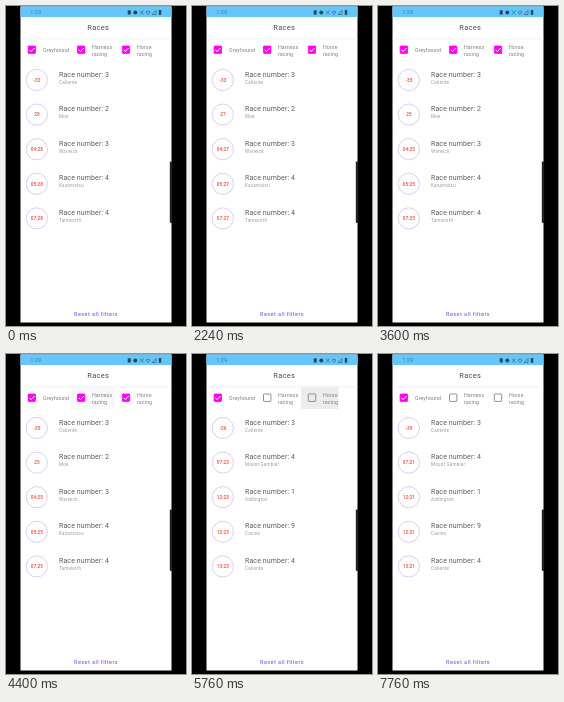
These frames come from a looping animation (180 px wide and 320 px high, 8000 ms). An HTML page:

```html
<!DOCTYPE html>
<html lang="en">
<head>
<meta charset="utf-8">
<title>Races</title>
<style>
  html, body { margin: 0; width: 100%; height: 100%; overflow: hidden; background: #000; }
  svg { display: block; width: 100vw; height: 100vh; font-family: Roboto, sans-serif; }
  .label { font-size: 5.3px; fill: #808080; letter-spacing: .08px; }
  .race { font-size: 7px; fill: #5c5c5c; letter-spacing: .12px; }
  .place { font-size: 4.5px; fill: #9a9a9a; letter-spacing: .24px; }
  .count { font-size: 4.7px; font-weight: 700; fill: #ff5c58; text-anchor: middle; }
  .ring { fill: #fff; stroke: #cdb8f4; stroke-width: .7; }
</style>
</head>
<body>
<svg id="stage" viewBox="0 0 180 320"></svg>
<script>
const LOOP = 8000;
const stage = document.getElementById('stage');

function add(tag, attrs, text) {
  const el = document.createElementNS('http://www.w3.org/2000/svg', tag);
  for (const key in attrs) el.setAttribute(key, attrs[key]);
  if (text !== undefined) el.textContent = text;
  stage.appendChild(el);
  return el;
}
const rect = (x, y, width, height, fill) => add('rect', { x, y, width, height, fill });
const show = (el, on) => el.setAttribute('visibility', on ? 'visible' : 'hidden');
const setText = (el, text) => { if (el.textContent !== text) el.textContent = text; };
const clamp = v => Math.max(0, Math.min(1, v));
const passed = (times, t) => times.filter(at => t >= at).length;

// Screen and status bar
rect(14.5, .4, 151, 316.1, '#fff');
rect(14.5, .4, 151, 10.6, '#64c6fb');
add('text', { x: 24.3, y: 8.3, 'font-size': 5.6, fill: '#4b7f9c' }, '1:29');
rect(121.7, 4.3, 3, 4.2, '#24485c');
add('circle', { cx: 129.3, cy: 6.4, r: 2, fill: '#24485c' });
add('path', { d: 'M134 4.5l3.5 4M137.5 4.5l-3.5 4M140 6q2-2 4 0l-2 2.5zM146 8.5l4-4v4z', fill: 'none', stroke: '#3f6c84', 'stroke-width': .8 });
rect(152.8, 4, 2.4, 4.8, '#24485c');

add('text', { x: 92.2, y: 24.1, 'font-size': 7.5, fill: '#4c4c4c', 'letter-spacing': .25, 'text-anchor': 'middle' }, 'Races');
rect(14.5, 32.6, 151, .6, '#dce8ed');

// Filters: box x, label x, lines, ripple bounds, press / release / fade end
const filters = [
  { x: 21.7, lx: 37, lines: ['Greyhound'] },
  { x: 71.1, lx: 86, lines: ['Harness', 'racing'], left: 65, right: 109, tint: '#f8f8f8', press: 4200, off: 4560, end: 4800 },
  { x: 115.9, lx: 131, lines: ['Horse', 'racing'], left: 109, right: 146.5, tint: '#ececec', press: 5300, off: 5520, end: 6000 }
];
for (const f of filters) {
  if (f.off) f.ripple = rect(f.left, 33.2, f.right - f.left, 21.8, f.tint);
  f.box = add('rect', { x: f.x + .4, y: 40, width: 7.4, height: 7.4, rx: .6, 'stroke-width': .8 });
  f.tick = add('path', { d: `M${f.x + 1.7} 43.8l1.7 1.8 3.3-3.6`, fill: 'none', stroke: '#fff', 'stroke-width': 1 });
  f.lines.forEach((line, i) => {
    const y = f.lines.length === 1 ? 46 : 43 + i * 6.5;
    add('text', { x: f.lx, y, class: 'label' }, line);
  });
}

// Races: number, place, minutes
const first = ['3', 'Caliente'];
const gambier = ['4', 'Mount Gambier', '07:'];
const all = [first, ['2', 'Moe', ''], ['3', 'Warwick', '04:'], ['4', 'Kasamatsu', '05:'], ['4', 'Tamworth', '07:']];
const noHarness = [...all.slice(0, 4), gambier];
const greyhounds = [first, gambier, ['1', 'Addington', '12:'], ['9', 'Casino', '12:'], ['4', 'Caliente', '13:']];

const rows = all.map((_, i) => {
  const y = 74 + i * 34.6;
  add('circle', { cx: 30.8, cy: y, r: 10.6, class: 'ring' });
  return {
    count: add('text', { x: 30.9, y: y + 1.7, class: 'count' }, ''),
    race: add('text', { x: 53, y: y - 3.4, class: 'race' }, ''),
    place: add('text', { x: 53, y: y + 3.6, class: 'place' }, '')
  };
});

add('text', { x: 90.1, y: 310, 'font-size': 5.5, 'font-weight': 500, fill: '#9162f2', 'letter-spacing': .42, 'text-anchor': 'middle' }, 'Reset all filters');
add('rect', { x: 163.8, y: 155.5, width: 2.4, height: 61.5, rx: 1, fill: '#222' });

// The first row ticks late once the list has been rebuilt
const ticks = [1440, 2400, 3440, 4560];
const listTicks = [...ticks, 5440, 6320, 7440];
const topTicks = [...ticks, 5840, 6800, 7760];

function draw(t) {
  for (const f of filters) {
    const on = !f.off || t < f.off;
    f.box.setAttribute('fill', on ? '#ff00f5' : 'none');
    f.box.setAttribute('stroke', on ? '#ff00f5' : '#777');
    show(f.tick, on);
    if (f.ripple) {
      const rise = clamp((t - f.press) / 160);
      const fall = clamp((f.end - t) / 200);
      f.ripple.setAttribute('opacity', Math.min(rise, fall));
    }
  }
  const list = t < 4640 ? all : t < 5600 ? noHarness : greyhounds;
  const seconds = 28 - passed(listTicks, t);
  rows.forEach((row, i) => {
    const [number, place, minutes] = list[i];
    setText(row.count, i ? minutes + seconds : '-' + (32 + passed(topTicks, t)));
    setText(row.race, 'Race number: ' + number);
    setText(row.place, place);
  });
}

const start = performance.now();
function frame() {
  draw((performance.now() - start) % LOOP);
  requestAnimationFrame(frame);
}
frame();
</script>
</body>
</html>
```
